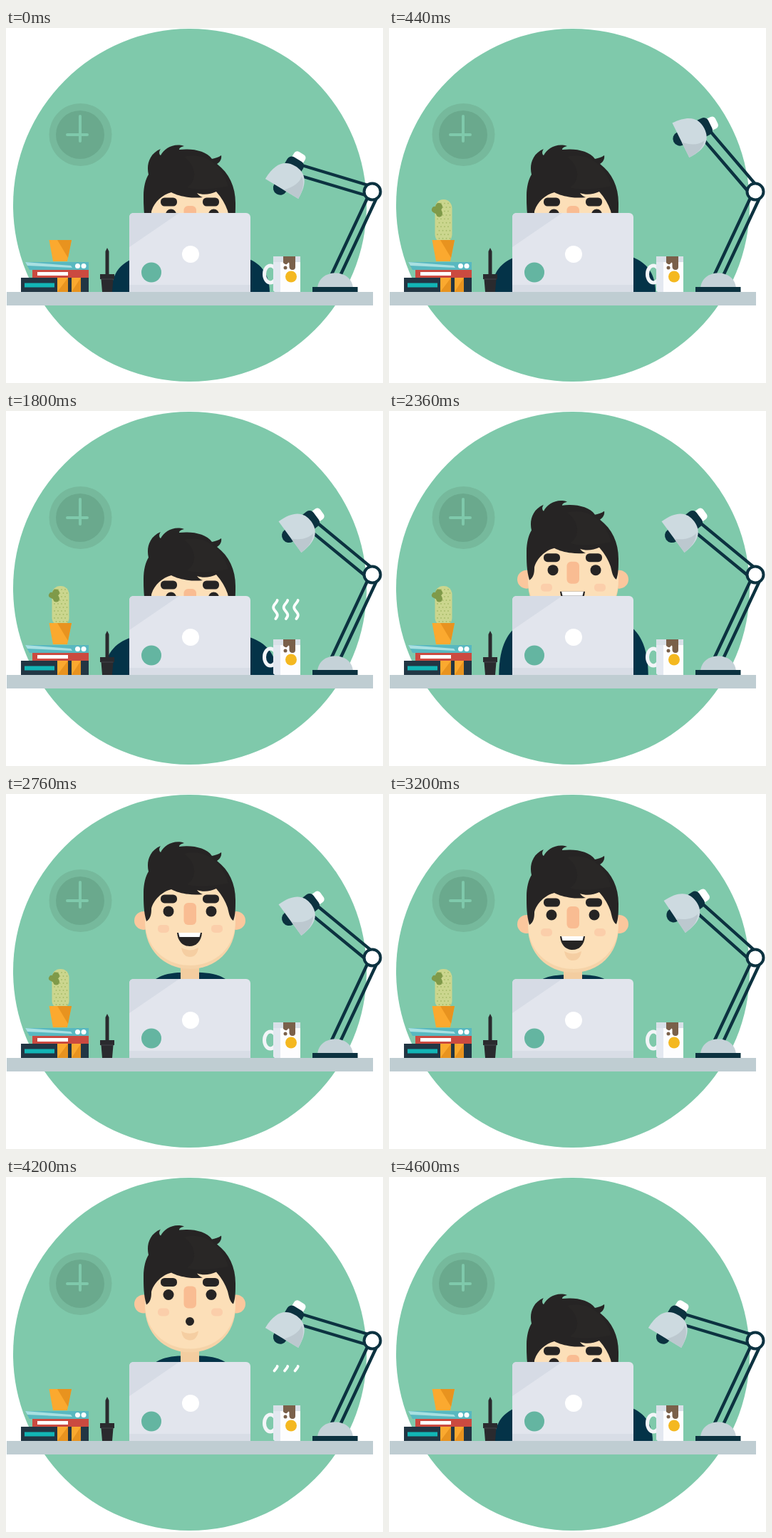
Recreate the animation shown at these times as an HTML page. Size 529 by 499 pixels, loop 4.64 s.

```html
<!DOCTYPE html>
<html>
<head>
<meta charset="utf-8">
<title>Desk</title>
<style>
html, body { margin: 0; width: 100%; height: 100%; overflow: hidden; background: #fff; }
svg { display: block; width: 100vw; height: 100vh; }
</style>
</head>
<body>
<svg viewBox="0 0 529 499" xmlns="http://www.w3.org/2000/svg">
  <defs>
    <linearGradient id="beam" gradientUnits="userSpaceOnUse" x1="402" y1="172" x2="324" y2="250">
      <stop offset="0" stop-color="#fff" stop-opacity=".52"/>
      <stop offset="1" stop-color="#fff" stop-opacity="0"/>
    </linearGradient>
    <clipPath id="aboveDesk"><rect width="529" height="371"/></clipPath>
    <clipPath id="faceShape"><path d="M205 226C197 240 195 260 195 279C195 317 223 343 258.500 343S322 317 322 279C322 260 319 240 311 226Z"/></clipPath>
  </defs>

  <circle cx="258" cy="249" r="248" fill="#7fc9ab"/>

  <g id="clock">
    <circle cx="104.500" cy="150" r="44" fill="#76b99c"/>
    <circle cx="104" cy="150" r="34" fill="#6aa98d"/>
    <path d="M104 124V159M86 150H114" stroke="#7fc9ab" stroke-width="4" stroke-linecap="round"/>
  </g>

  <g clip-path="url(#aboveDesk)">
    <path id="body" fill="#043348"/>
    <g id="head">
      <path d="M245 325H271V364H245Z" fill="#f3cda0"/>
      <circle cx="193" cy="275" r="13" fill="#fbc79d"/>
      <circle cx="323" cy="275" r="13" fill="#fbc79d"/>
      <g clip-path="url(#faceShape)">
        <rect x="190" y="205" width="140" height="145" fill="#f5d3a8"/>
        <path d="M195 200V275C195 312 223 338 258.500 338S322 312 322 275V200Z" fill="#fcdfb8"/>
      </g>
      <rect x="213" y="281" width="16" height="11" rx="5" fill="#fbceaa"/>
      <rect x="288" y="281" width="16" height="11" rx="5" fill="#fbceaa"/>
      <rect x="249.500" y="250" width="17.500" height="31" rx="6" fill="#f9bc92"/>
      <g id="eyes" fill="#262424">
        <circle cx="228" cy="262" r="7.500"/>
        <circle cx="288" cy="262" r="7.500"/>
      </g>
      <rect x="217" y="238.500" width="23" height="12" rx="5.500" fill="#262424"/>
      <rect x="276" y="238.500" width="23" height="12" rx="5.500" fill="#262424"/>
      <path d="M246 313Q258 320 270 313Q268 326 258 326T246 313Z" fill="#f5cea2"/>
      <g id="smile">
        <path d="M240 292H275C274 304 267 311 257.500 311S241 304 240 292Z" fill="#262424"/>
        <path d="M242 292H273L271.500 298H243.500Z" fill="#fff"/>
      </g>
      <circle id="gasp" cx="258" cy="299.500" r="6" fill="#262424"/>
      <path d="M197 276C193 262 193 249 193 236C193 223 196 212 200 206C197 194 200 177 217 170C214 174 215 178 217 179C222 169 236 161 250 166C245 167 243 169 243 171C260 169 281 172 289 184C293 183 298 182 302 179C303 184 300 189 296 191C313 204 322 223 322 246C322 258 322 267 319 275C314 272 313 265 311 257C308 248 303 239 295 230C287 234 276 235 268 232C270 235 273 237 276 238C262 240 243 237 232 231C219 234 207 246 204 258C204 266 203 272 197 276Z" fill="#262424"/>
      <path d="M250 181C278 174 302 190 312 222C296 226 268 229 254 224C269 214 267 194 250 181Z" fill="#2c2a29" opacity=".5"/>
    </g>
  </g>

  <g id="laptop">
    <rect x="173" y="260" width="170" height="114" rx="6" fill="#e2e5ed"/>
    <path d="M179 260H243L173 308V266Q173 260 179 260Z" fill="#d6dbe5"/>
    <rect x="173" y="361" width="170" height="10" fill="#d8dde6"/>
    <circle cx="259" cy="318" r="12" fill="#fff"/>
    <circle cx="204" cy="343.500" r="14" fill="#64b5a1"/>
  </g>

  <g id="books">
    <rect x="21" y="351" width="95" height="20" fill="#223644"/>
    <rect x="26" y="358.500" width="42" height="6" fill="#12b5b6"/>
    <path d="M72 351H87V371H72ZM92 351H105V371H92Z" fill="#fba92f"/>
    <path d="M87 351V371H72ZM105 351V371H92Z" fill="#e8931f"/>
    <rect x="37" y="340" width="79" height="11" fill="#cb4a40"/>
    <rect x="44" y="343" width="43" height="5" fill="#fff"/>
    <path d="M27 329H116V340H33Z" fill="#58b8c0"/>
    <path d="M27 329L91 334L93 337L30 334Z" fill="#a9e0e1"/>
    <circle cx="100.500" cy="334.500" r="3.500" fill="#fff"/>
    <circle cx="109" cy="334.500" r="3.500" fill="#fff"/>
  </g>

  <g id="cactus">
    <rect x="64.500" y="246" width="24" height="56" rx="11.500" fill="#cbd68e"/>
    <g id="spots" fill="#a7bb69"></g>
    <path d="M64 259L70 262" stroke="#7f9a49" stroke-width="8" stroke-linecap="round"/>
    <circle cx="70" cy="255.500" r="5" fill="#7f9a49"/>
    <circle cx="70.500" cy="264" r="4.500" fill="#7f9a49"/>
  </g>
  <path d="M60.500 298H92L86 328H66Z" fill="#fba92f"/>
  <path d="M72 298H92L87 323Z" fill="#e8931f"/>

  <g id="pen" fill="#2a2a2e">
    <path d="M139.500 346V314L142 309L144.500 314V346Z"/>
    <path d="M132 346H152V353H150.500L149 371H135L133.500 353H132Z"/>
    <path d="M133.500 353H150.500" stroke="#44444a"/>
  </g>

  <g id="mug">
    <ellipse cx="371" cy="346" rx="8.500" ry="12" fill="none" stroke="#f3f5f8" stroke-width="5"/>
    <path d="M375 321H413V371H379Q375 371 375 367Z" fill="#fdfdfe"/>
    <path d="M375 321H385V371H379Q375 371 375 367Z" fill="#e3e8f0"/>
    <path d="M375 321H413V329H375Z" fill="#d9e0e8"/>
    <path d="M389 321H406V336Q406 340 402 340T397.500 336V331Q397 328 395 331T389 330Z" fill="#7a604a"/>
    <circle cx="392" cy="337" r="2.500" fill="#7a604a"/>
    <circle cx="400" cy="349.500" r="8" fill="#f4b820"/>
  </g>
  <g id="steam" fill="none" stroke="#fff" stroke-width="3.800" stroke-linecap="round" stroke-linejoin="round"></g>

  <g id="lamp">
    <path d="M457 346L507.500 238M469 348L519.500 240" stroke="#0c3240" stroke-width="4.400"/>
    <path d="M437 366C438 352 449 344.500 462 344.500S486 352 487 366Z" fill="#c5d2d8"/>
    <rect x="430" y="364" width="63.500" height="7" fill="#0c3240"/>
    <g id="arm">
      <path d="M412 192L508 221M409 206.500L506 235.500" stroke="#0c3240" stroke-width="4.400"/>
      <g transform="translate(387 226) rotate(31)">
        <rect x="-11" y="-57" width="18" height="18" rx="5" fill="#fff"/>
        <rect x="-15" y="-47" width="26" height="20" rx="7" fill="#0c3240"/>
        <circle cx="-2.500" cy="0" r="10" fill="#0c3240"/>
        <path d="M-27 0C-27 -27 -16 -37 0 -37S27 -27 27 0Z" fill="#cddae0"/>
        <path d="M3 0C13 -10 17 -20 15 -29C23 -24 27 -13 27 0Z" fill="#bcc8cf"/>
      </g>
    </g>
    <circle cx="514" cy="230" r="11.500" fill="#fff" stroke="#0c3240" stroke-width="4"/>
  </g>

  <path id="light" d="M383 159L264 167L300 290L374 324L413 196Z" fill="url(#beam)"/>
  <rect x="1" y="371" width="514" height="19" fill="#bfcdd2"/>
</svg>

<script>
const LOOP = 4640;
const $ = id => document.getElementById(id);
const clamp = v => Math.min(1, Math.max(0, v));
const mix = (a, b, u) => a + (b - a) * u;
const ramp = (t, start, span) => clamp((t - start) / span);

function add(parent, tag, attrs) {
  const el = document.createElementNS("http://www.w3.org/2000/svg", tag);
  for (const k in attrs) el.setAttribute(k, attrs[k]);
  return parent.appendChild(el);
}

// Smooth curve through [time, value] keys that never overshoots a key
function track(keys) {
  const slope = i => (keys[i + 1][1] - keys[i][1]) / (keys[i + 1][0] - keys[i][0]);
  const tangent = keys.map((k, i) => {
    if (!i || i === keys.length - 1) return 0;
    const a = slope(i - 1), b = slope(i);
    return a * b > 0 ? 2 * a * b / (a + b) : 0;
  });
  return t => {
    if (t <= keys[0][0]) return keys[0][1];
    for (let i = 0; i < keys.length - 1; i++) {
      const [t0, v0] = keys[i], [t1, v1] = keys[i + 1];
      if (t > t1) continue;
      const d = t1 - t0, s = (t - t0) / d, r = 1 - s;
      return r * r * ((1 + 2 * s) * v0 + s * d * tangent[i]) +
             s * s * ((3 - 2 * s) * v1 - r * d * tangent[i + 1]);
    }
    return keys[keys.length - 1][1];
  };
}

const lampAngle = track([[40, 0], [440, 32.8], [680, 22.8], [3120, 22.8], [3380, 32.8], [3660, -3.5], [3840, 0]]);
const cactusSize = track([[40, 0], [420, 1.1], [640, 1], [3200, 1], [3360, 1.1], [3640, 0]]);
const rise = track([[2160, 0], [2240, 17], [2760, 97], [2880, 107], [3160, 92], [3940, 92], [4120, 106], [4560, 0]]);
const elbows = track([[40, 111], [440, 115], [760, 121], [4100, 121], [4500, 111]]);
const lightOn = track([[720, 0], [840, 1], [1360, 1], [1480, 0]]);
const gaspSize = track([[3240, 0], [3360, 1]]);

for (let row = 0; row < 10; row++)
  for (let col = 0; col < 4; col++)
    add($("spots"), "circle", { cx: 68 + col * 5 + row % 2 * 2.5, cy: 251 + row * 5, r: .9 });

const wisps = [378, 392.5, 407].map(x => ({ x, el: add($("steam"), "path", {}) }));

function drawSteam(age) {
  const low = 309 - 43 * ramp(age, 180, 460);
  const high = 309 - 43 * ramp(age, 0, 310);
  for (const { x, el } of wisps) {
    let d = "";
    if (low - high > .5)
      for (let i = 0; i <= 24; i++) {
        const y = mix(low, high, i / 24);
        d += (i ? "L" : "M") + (x + 2.8 * Math.cos((309 - y) * Math.PI / 11)).toFixed(2) + " " + y.toFixed(2);
      }
    el.setAttribute("d", d);
  }
}

function drawBody(up, spread) {
  const u = up / 92, x = 259;
  const w = mix(spread, 82, Math.min(1, u));
  const top = mix(371 - spread / 2, 254, u);
  $("body").setAttribute("d",
    `M${x - w} 372C${x - w} ${top} ${x - w / 2} ${top} ${x} ${top}S${x + w} ${top} ${x + w} 372Z`);
}

function draw(t) {
  const up = rise(t), size = cactusSize(t), gasp = gaspSize(t);
  $("arm").setAttribute("transform", `rotate(${lampAngle(t)} 514 230)`);
  $("cactus").setAttribute("transform",
    `translate(76.500 298) scale(${size < 1 ? .6 + .4 * size : 1} ${size}) translate(-76.500 -298)`);
  $("cactus").setAttribute("visibility", size > .01 ? "visible" : "hidden");
  $("head").setAttribute("transform", `translate(0 ${-up})`);
  $("eyes").setAttribute("transform", `translate(${3.5 * (1 - clamp(up / 92))} 0)`);
  $("smile").setAttribute("transform", `translate(257.500 299) scale(${1 - gasp}) translate(-257.500 -299)`);
  $("gasp").setAttribute("r", 6 * gasp);
  $("light").setAttribute("opacity", lightOn(t));
  drawBody(up, elbows(t));
  drawSteam(t < 3000 ? t - 1440 : t - 3630);
}

const begin = performance.now();
function frame() {
  draw((performance.now() - begin) % LOOP);
  requestAnimationFrame(frame);
}
frame();
</script>
</body>
</html>
```
